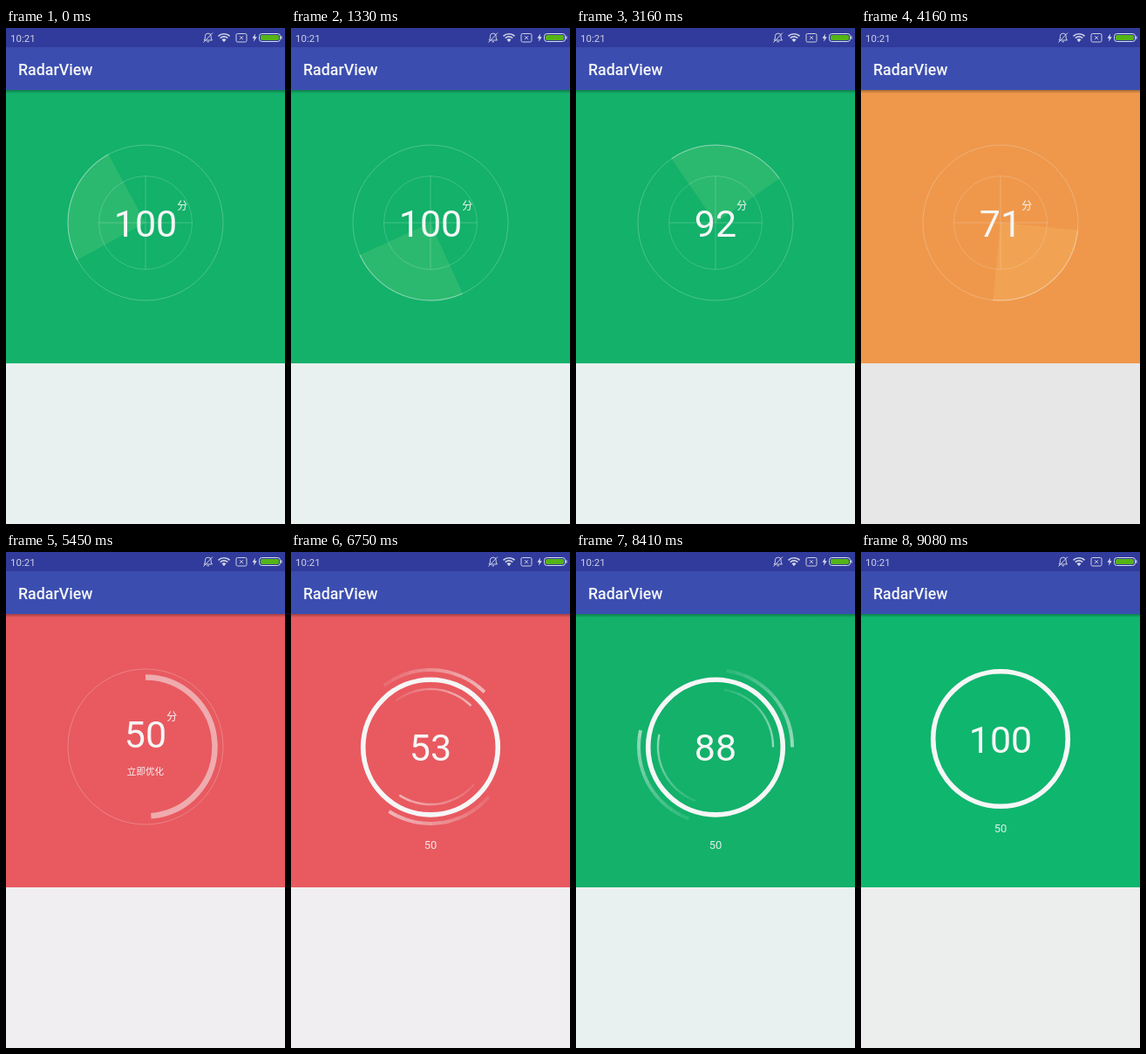
Write an HTML page that moves like this. It is 320 by 568 pixels and loops after 9120 ms.

```html
<!DOCTYPE html>
<html lang="zh">
<head>
<meta charset="utf-8">
<style>
  html, body { margin: 0; width: 100%; height: 100%; overflow: hidden; }
  svg { display: block; width: 100vw; height: 100vh; }
  text { font-family: Roboto, "Noto Sans CJK SC", "Noto Sans CJK", sans-serif; fill: #f6f6f6; }
  .mid { text-anchor: middle; }
  .line { fill: none; stroke: #f6f6f6; }
</style>
</head>
<body>
<svg viewBox="0 0 320 568">
  <defs>
    <linearGradient id="shade" x2="0" y2="1">
      <stop stop-opacity=".3"/><stop offset="1" stop-opacity="0"/>
    </linearGradient>
  </defs>
  <rect id="page" width="320" height="568"/>
  <rect id="panel" y="71" width="320" height="313"/>
  <rect y="71" width="320" height="4" fill="url(#shade)"/>
  <rect width="320" height="71" fill="#3b4eb0"/>
  <rect width="320" height="22" fill="#303b9b"/>
  <text x="14" y="54" font-size="17.8" font-weight="500">RadarView</text>

  <g id="status" opacity=".8">
    <text x="5" y="15.7" font-size="11.5">10:21</text>
    <g class="line" stroke-width="1">
      <path d="M227 14h9.500l-1.300-2V9.500a3.400 3.400 0 0 0-6.800 0V12zM230.500 15.800h2.500M226.500 16.500 237 5.500"/>
      <rect x="264" y="6.500" width="12" height="9.500" rx="1.500"/>
      <path d="m268 9.200 4 4m0-4-4 4"/>
      <path d="M243.500 9.300a9.500 9.500 0 0 1 13 0M245.800 11.600a6.200 6.200 0 0 1 8.400 0" stroke-width="1.700"/>
    </g>
    <path d="M247.500 13.300a3.700 3.700 0 0 1 5 0L250 16.300zM286 6.500l-3.500 5.300h2.200l-.7 4 3.800-5.500h-2.300z" fill="#fff"/>
  </g>
  <rect x="290.500" y="6.500" width="24" height="9" rx="3" fill="none" stroke="#d8dcec"/>
  <rect x="292" y="8" width="21" height="6" rx="1.800" fill="#55b516"/>
  <rect x="315.300" y="9.300" width="1.200" height="3.400" fill="#d8dcec"/>

  <circle id="rim" class="line" cx="160" cy="223" r="89" stroke-opacity=".25"/>
  <g id="radar">
    <circle class="line" cx="160" cy="223" r="53.500" stroke-opacity=".2"/>
    <path class="line" d="M106.500 223h107M160 169.500v107" stroke-opacity=".22"/>
    <g id="sweep">
      <path d="M0 0H89A89 89 0 0 1 0 89z" fill="#ffffa0" fill-opacity=".1"/>
      <path class="line" d="M89 0A89 89 0 0 1 0 89" stroke-opacity=".35"/>
    </g>
  </g>
  <g id="result">
    <path id="gauge" class="line" stroke-width="6.500" stroke-opacity=".52"/>
    <text id="action" class="mid" x="160" y="255.300" font-size="10.600">立即优化</text>
  </g>
  <g id="boost">
    <g id="trails"></g>
    <circle id="ring" class="line" cx="160" r="77.300" stroke-width="5.600"/>
    <text id="before" class="mid" x="160" font-size="13" opacity=".9">50</text>
  </g>
  <text id="score" class="mid" x="160" font-size="43"></text>
  <text id="unit" font-size="12">分</text>
</svg>
<script>
const LOOP = 9120, CX = 160, CY = 223, TICK = 48;
const DROP = 2752, SCORED = DROP + 50 * TICK;
const TAP = 6370, RISE = 6580, DONE = RISE + 50 * TICK;
const SWEEP = [[0, 151], [1330, 785], [3160, 1675], [4160, 2165], [5160, 2654]];
const THEMES = {
  green: ['#13b16a', '#e8f0f0'],
  orange: ['#ef984b', '#e7e7e7'],
  red: ['#e85a60', '#f0eef0'],
  done: ['#0fb66e', '#eceeee']
};

const $ = id => document.getElementById(id);
const set = (id, attrs) => {
  for (const key in attrs) $(id).setAttribute(key, attrs[key]);
};
const show = (id, on) => set(id, { visibility: on ? 'visible' : 'hidden' });
const clamp = (v, lo = 0, hi = 1) => Math.min(hi, Math.max(lo, v));
const progress = (t, start, length) => clamp((t - start) / length);
const smooth = p => (1 - Math.cos(Math.PI * p)) / 2;

function arc(r, from, to, cx = 0, cy = 0) {
  const at = deg => {
    const a = deg * Math.PI / 180;
    return `${cx + r * Math.cos(a)} ${cy + r * Math.sin(a)}`;
  };
  return `M${at(from)}A${r} ${r} 0 ${to - from > 180 ? 1 : 0} 1 ${at(to)}`;
}

function interpolate(knots, t) {
  let i = 1;
  while (i < knots.length - 1 && t > knots[i][0]) i++;
  const [t0, v0] = knots[i - 1], [t1, v1] = knots[i];
  return v0 + (v1 - v0) * (t - t0) / (t1 - t0);
}

// Each trail brightens towards its clockwise end.
function buildTrails() {
  const parts = 12, span = 82;
  let markup = '';
  for (const [r, width] of [[88, 4], [66, 2.4]])
    for (const start of [200, 8])
      for (let i = 0; i < parts; i++) {
        const from = start + span * i / parts;
        markup += `<path class="line" d="${arc(r, from, from + span / parts)}"
          stroke-width="${width}" stroke-opacity="${0.12 + 0.5 * i / parts}"/>`;
      }
  $('trails').innerHTML = markup;
}

function scoreAt(t) {
  if (t < TAP) return 100 - clamp(Math.floor((t - DROP) / TICK), 0, 50);
  return 50 + clamp(Math.floor((t - RISE) / TICK), 0, 50);
}

function themeAt(score, t) {
  if (t >= DONE) return THEMES.done;
  return score >= 80 ? THEMES.green : score >= 60 ? THEMES.orange : THEMES.red;
}

function render(t) {
  const score = scoreAt(t);
  const scanning = t < SCORED, boosting = t >= TAP;
  const [panel, page] = themeAt(score, t);
  set('panel', { fill: panel });
  set('page', { fill: page });

  show('radar', scanning);
  set('sweep', { transform: `translate(${CX} ${CY}) rotate(${interpolate(SWEEP, t)})` });

  const enter = smooth(progress(t, SCORED, 280));
  const leave = smooth(progress(t, TAP, 200));
  const finish = progress(t, DONE, 158);
  const lift = 15 * (enter - leave + finish);

  set('rim', { opacity: 1 - leave });
  show('result', !scanning);
  set('result', { opacity: 1 - leave });
  set('action', { opacity: enter });
  const turn = 180 * smooth(progress(t, SCORED, 333));
  set('gauge', { d: arc(79.5, -90, -90 + turn, CX, CY) });

  show('boost', boosting);
  set('boost', { opacity: leave });
  show('trails', boosting && t < DONE);
  set('trails', { transform: `translate(${CX} ${CY}) rotate(${(t - 7660) * 0.36})` });
  set('ring', { cy: 223.6 - lift });
  set('before', { y: 339.7 - 2 * lift });

  $('score').textContent = score;
  set('score', { y: 239.4 - lift });
  set('unit', { x: score === 100 ? 196.3 : 184.2, y: 207.6 - lift, opacity: 1 - leave });
}

buildTrails();
const began = performance.now();
function frame() {
  render((performance.now() - began) % LOOP);
  requestAnimationFrame(frame);
}
frame();
</script>
</body>
</html>
```
